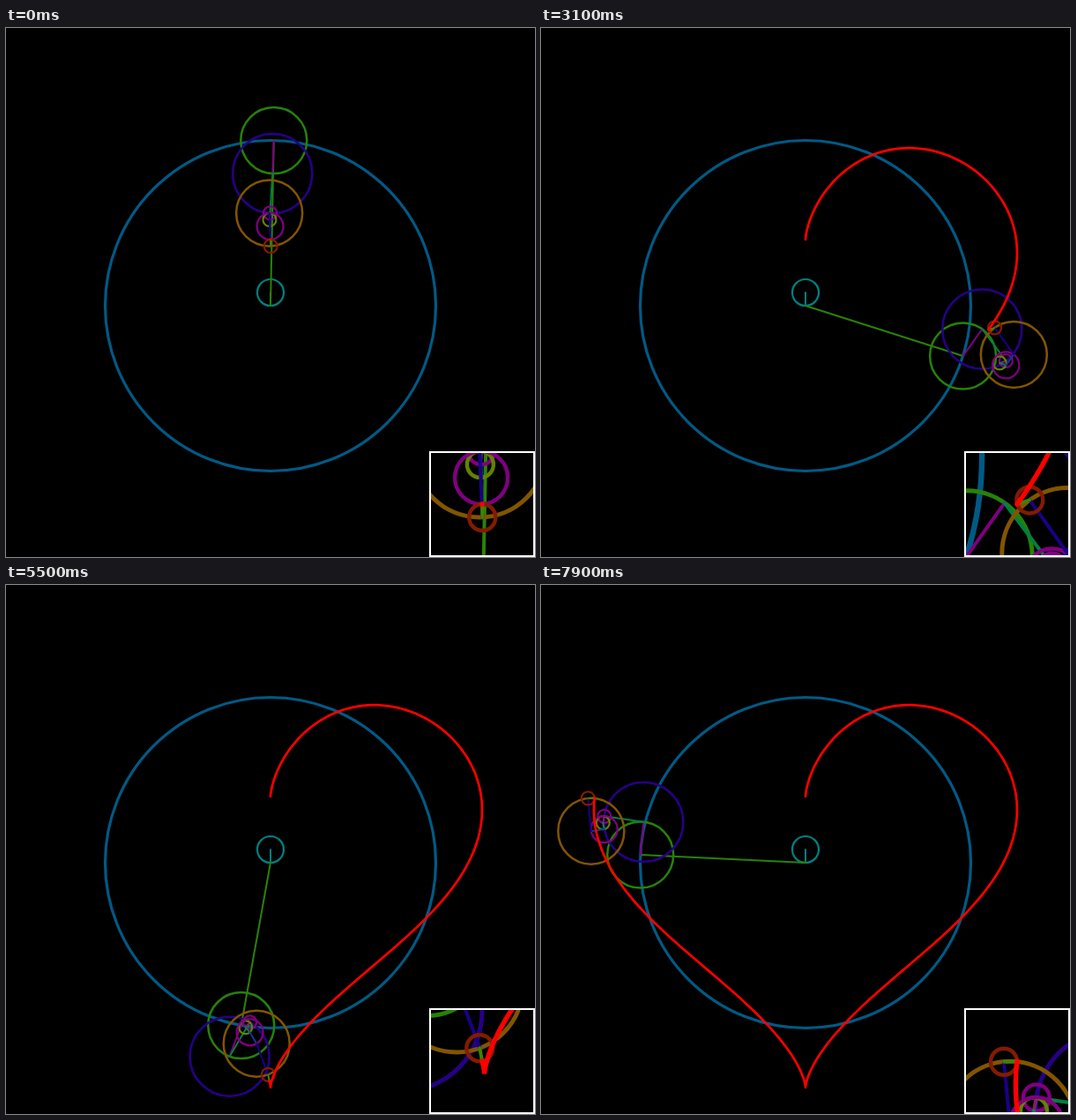
An HTML page with a canvas that plays this animation: 600 px wide and 600 px high, repeating every 8 s.

```html
<!DOCTYPE html>
<html lang="en">
<head>
<meta charset="utf-8">
<title>Heart from epicycles</title>
<style>
  html, body { margin: 0; width: 100%; height: 100%; overflow: hidden; background: #000; }
  canvas { display: block; width: 600px; height: 600px; }
</style>
</head>
<body>
<canvas id="stage" width="600" height="600"></canvas>
<script>
const ctx = document.getElementById('stage').getContext('2d');
const LOOP = 8000, STEP = 100;
const DT = 0.02, STEPS_PER_TICK = 3;

// Chain of rotating arms: frequency, signed length, ring colour, arm colour, ring width
const ARMS = [
  [0, -15, '#008080', '#008080', 2.2],
  [1, 187.5, '#005a85', '#2a8208', 3.2],
  [2, -37.5, '#268208', '#800080', 2.5],
  [3, -45, '#260085', '#008040', 2.5],
  [4, -7.5, '#800080', '#802060', 2.2],
  [-4, -7.5, '#638200', '#008060', 2.2],
  [-3, 15, '#800080', '#103a90', 2.2],
  [-2, -37.5, '#825500', '#1a0085', 2.5],
  [-1, 7.5, '#821c00', '#3f8200', 2.2]
];

// Joints of the chain at angle a, from the centre to the pen
function joints(a) {
  let x = 300, y = 300;
  const points = [[x, y]];
  for (const [k, len] of ARMS) {
    x += len * Math.sin(k * a);
    y -= len * Math.cos(k * a);
    points.push([x, y]);
  }
  return points;
}

const pen = a => joints(a)[ARMS.length];

function strokeLine(points, color, width) {
  ctx.strokeStyle = color;
  ctx.lineWidth = width;
  ctx.beginPath();
  points.forEach(([x, y]) => ctx.lineTo(x, y));
  ctx.stroke();
}

function drawScene(chain, trail) {
  ARMS.forEach(([, len, ring, arm, width], i) => {
    const [x, y] = chain[i];
    ctx.strokeStyle = ring;
    ctx.lineWidth = width;
    ctx.beginPath();
    ctx.arc(x, y, Math.abs(len), 0, 2 * Math.PI);
    ctx.stroke();
    strokeLine([chain[i], chain[i + 1]], arm, 2);
  });
  strokeLine(trail, '#f00', 2.7);
}

// Magnified view that follows the pen
function drawLens(chain, trail) {
  const [x, y] = chain[ARMS.length];
  ctx.save();
  ctx.beginPath();
  ctx.rect(480, 480, 120, 120);
  ctx.clip();
  ctx.fillStyle = '#000';
  ctx.fillRect(480, 480, 120, 120);
  ctx.translate(540, 540);
  ctx.scale(2, 2);
  ctx.translate(-x, -y);
  drawScene(chain, trail);
  ctx.restore();
  ctx.strokeStyle = '#fff';
  ctx.lineWidth = 2;
  ctx.strokeRect(481, 481, 118, 118);
}

function render(time) {
  const tick = Math.floor((time % LOOP) / STEP);
  const steps = tick * STEPS_PER_TICK + 1;
  const chain = joints(steps * DT);
  const trail = Array.from({ length: steps + 1 }, (_, i) => pen(i * DT));
  ctx.fillStyle = '#000';
  ctx.fillRect(0, 0, 600, 600);
  ctx.lineCap = ctx.lineJoin = 'round';
  drawScene(chain, trail);
  ctx.lineJoin = 'miter';
  drawLens(chain, trail);
}

const start = performance.now();
function loop() {
  render(performance.now() - start);
  requestAnimationFrame(loop);
}
loop();
</script>
</body>
</html>
```
